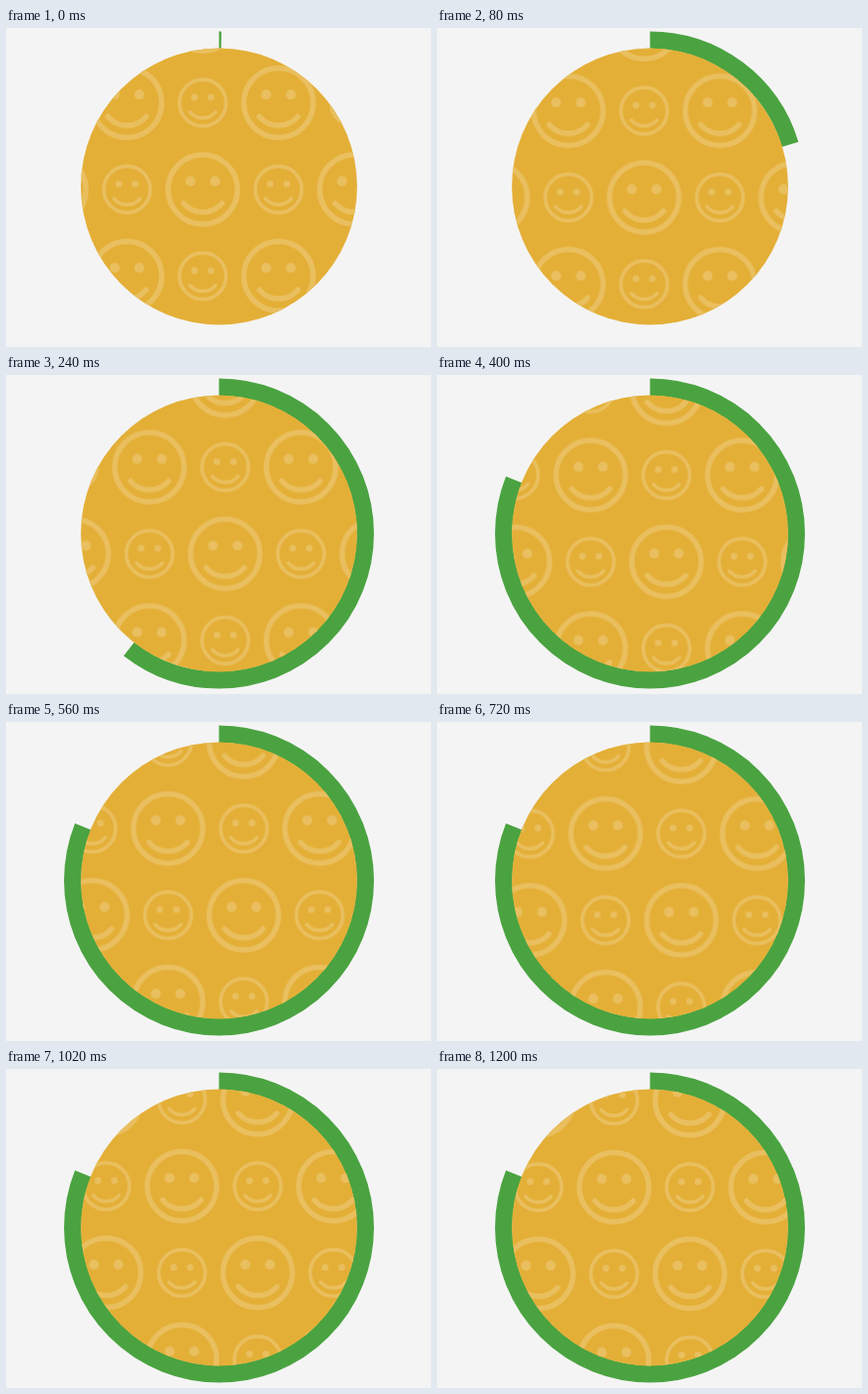
An HTML page without scripts for the animation above (1240 ms loop, 432 by 324 pixels).

```html
<!DOCTYPE html>
<html lang="en">
<head>
<meta charset="utf-8">
<title>Smiley progress ring</title>
<style>
  html, body { margin: 0; width: 100%; height: 100%; overflow: hidden; background: #f4f4f4; }
  svg { display: block; width: 100vw; height: 100vh; }

  .ring {
    fill: none;
    stroke: #4aa340;
    stroke-width: 17.4;
    stroke-dasharray: 291.6 360;
    animation: fill-ring 1240ms linear infinite;
  }
  .faces { animation: drift 1240ms infinite; }

  @keyframes fill-ring {
    0% { stroke-dashoffset: 291.6; }
    26%, 100% { stroke-dashoffset: 0; }
  }

  /* A short hold, a small jump, then a quadratic ease-out */
  @keyframes drift {
    0% { transform: translate(0, 0); animation-timing-function: step-end; }
    1.6% { transform: translate(5.3px, 4.1px); animation-timing-function: cubic-bezier(.333, .667, .667, 1); }
    97.2%, 100% { transform: translate(57px, 44px); }
  }
</style>
</head>
<body>
<svg viewBox="0 0 432 324">
  <defs>
    <g id="face">
      <circle r="35.3" fill="none" stroke="#e9bf5f" stroke-width="5.5"/>
      <g fill="#e9bf5f">
        <circle cx="-12.5" cy="-8.3" r="5.1"/>
        <circle cx="12.5" cy="-8.3" r="5.1"/>
      </g>
      <path d="M-19.5 14A25.5 25.5 0 0 0 19.5 14" fill="none" stroke="#e9bf5f" stroke-width="5.5" stroke-linecap="round"/>
    </g>
    <g id="small"><use href="#face" transform="scale(.67)"/></g>
    <pattern id="tile" x="123" y="120" width="154" height="176" patternUnits="userSpaceOnUse">
      <use href="#small" x="0" y="44"/>
      <use href="#face" x="77" y="44"/>
      <use href="#small" x="154" y="44"/>
      <use href="#face" x="0" y="132"/>
      <use href="#small" x="77" y="132"/>
      <use href="#face" x="154" y="132"/>
    </pattern>
    <clipPath id="disc"><circle cx="216.5" cy="161" r="140.4"/></clipPath>
  </defs>

  <rect width="432" height="324" fill="#f4f4f4"/>
  <path class="ring" pathLength="360" d="M216.5 12.2a148.8 148.8 0 0 1 0 297.6a148.8 148.8 0 0 1 0-297.6"/>
  <circle cx="216.5" cy="161" r="140.4" fill="#e4af37"/>
  <g clip-path="url(#disc)">
    <rect class="faces" x="-20" y="-60" width="440" height="400" fill="url(#tile)"/>
  </g>
</svg>
</body>
</html>
```
